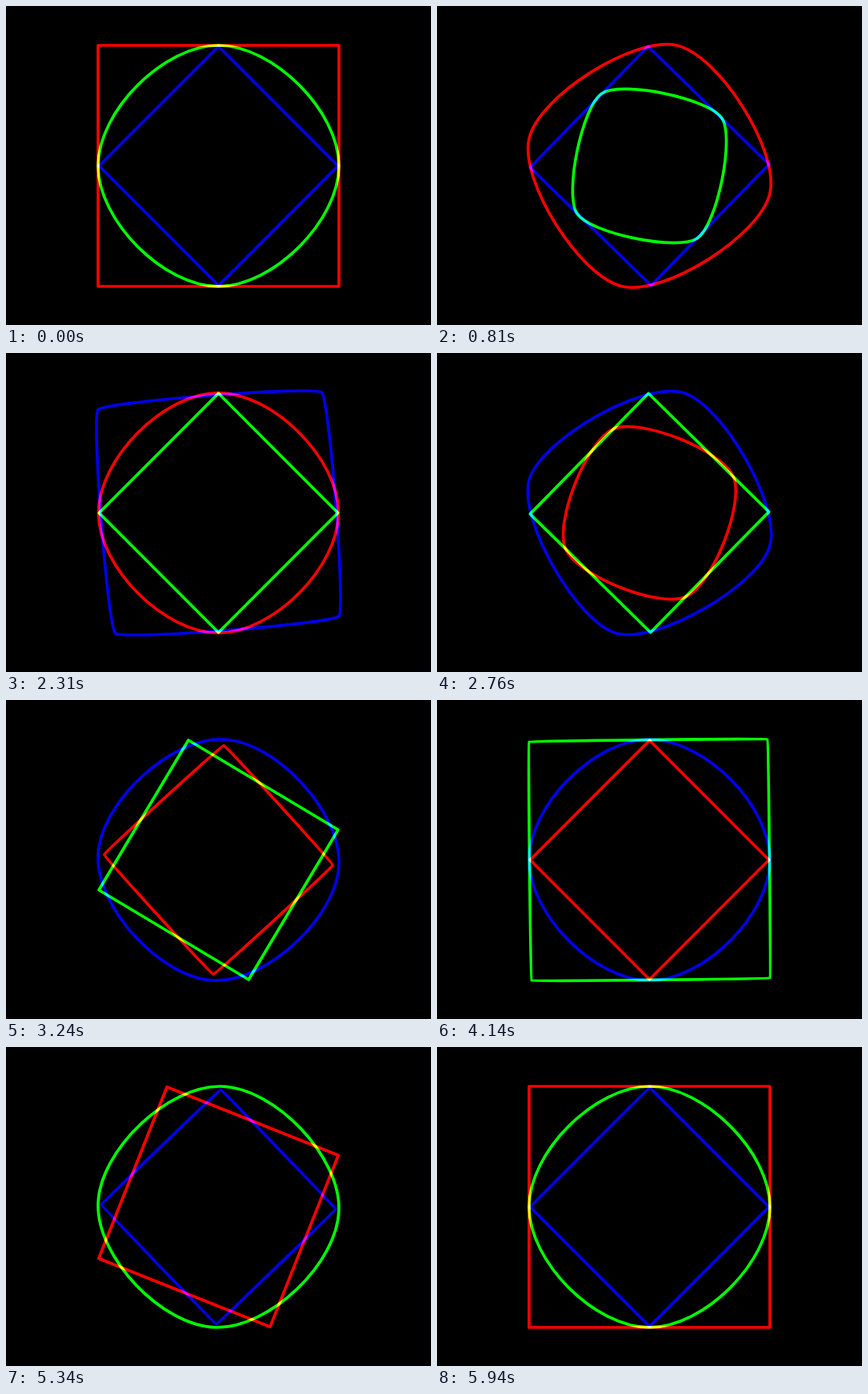
These frames come from a looping animation (540x405 px, 5970 ms). An HTML page with a canvas:

```html
<!DOCTYPE html>
<html lang="en">
<head>
<meta charset="utf-8">
<title>Square, circle, diamond</title>
<style>
  html, body { margin: 0; width: 100%; height: 100%; overflow: hidden; background: #000; }
  canvas { display: block; }
</style>
</head>
<body>
<canvas id="stage" width="540" height="405"></canvas>
<script>
const ctx = document.getElementById('stage').getContext('2d');
const LOOP = 5970, STEP = 30, CYCLE = 2000;
const CX = 270, CY = 203, R = 153, TIP = 151.7, ROUND = 0.455;
const COLORS = ['#f00', '#0f0', '#0000ec'];

const mix = (a, b, s) => a + (b - a) * s;

// S-curve from 0 to 1 that is halfway at x = mid; a higher power is steeper.
const sCurve = (mid, power) => x => {
  const a = Math.pow(x * (1 - mid), power);
  const b = Math.pow(mid * (1 - x), power);
  return a / (a + b);
};

// Each stage carries one corner in a straight line; the rest follow by quarter turns.
const STAGES = [
  // square to circle
  { from: [R, -R], to: [0, -R], round: [0, ROUND], ease: sCurve(0.285, 2.3) },
  // circle to diamond
  { from: [R, 0], to: [0, -TIP], round: [ROUND, 0], ease: sCurve(0.43, 4) },
  // diamond to square
  { from: [0, -TIP], to: [-R, -R], round: [0, 0], ease: sCurve(0.687, 3.7) }
];

function drawShape(phase, color) {
  const stage = STAGES[Math.floor(phase) % 3];
  const s = stage.ease(phase % 1);
  const k = mix(stage.round[0], stage.round[1], s);
  let x = mix(stage.from[0], stage.to[0], s);
  let y = mix(stage.from[1], stage.to[1], s);

  ctx.beginPath();
  ctx.moveTo(x, y);
  for (let i = 0; i < 4; i++) {
    const nx = y, ny = -x;
    // handles lie at right angles to the corner's radius
    ctx.bezierCurveTo(x + k * y, y - k * x, nx - k * ny, ny + k * nx, nx, ny);
    x = nx;
    y = ny;
  }
  ctx.closePath();
  ctx.strokeStyle = color;
  ctx.stroke();
}

function draw(now) {
  const t = Math.floor((now % LOOP) / STEP) * STEP;
  ctx.setTransform(1, 0, 0, 1, 0, 0);
  ctx.globalCompositeOperation = 'source-over';
  ctx.fillStyle = '#000';
  ctx.fillRect(0, 0, 540, 405);

  ctx.translate(CX, CY);
  ctx.globalCompositeOperation = 'lighter';
  ctx.lineWidth = 3.7;
  ctx.lineJoin = 'round';
  COLORS.forEach((color, i) => drawShape(t / CYCLE + i, color));
}

const start = performance.now();
function tick() {
  draw(performance.now() - start);
  requestAnimationFrame(tick);
}
tick();
</script>
</body>
</html>
```
